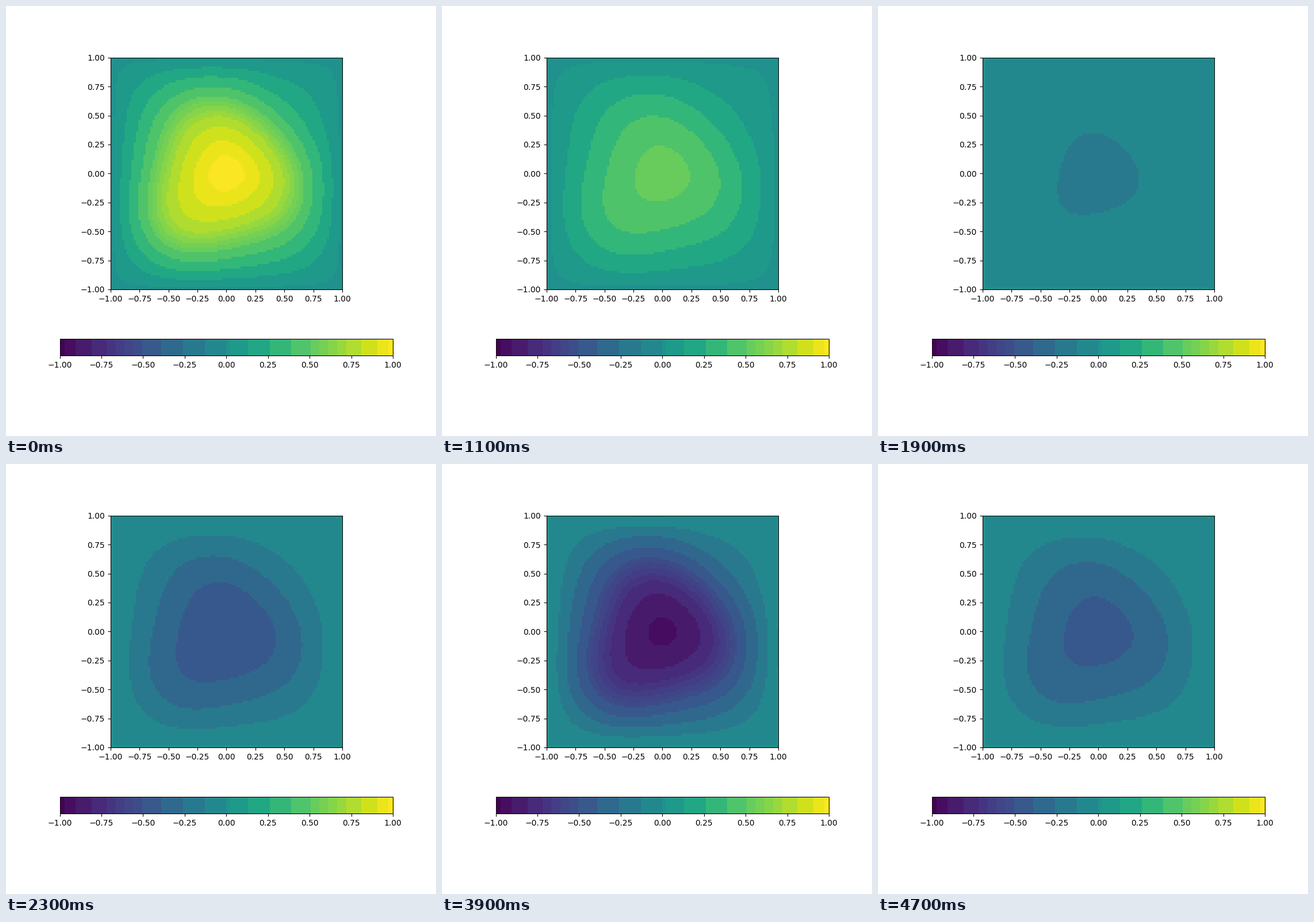
Recreate the animation shown at these times as a matplotlib script. Size 748 px wide and 748 px high, loop 4.9 s.

```python
import numpy as np
import matplotlib.pyplot as plt
from matplotlib.animation import FuncAnimation
from matplotlib.colors import ListedColormap

SIZE, INCHES = 748, 7.5
FRAMES, INTERVAL = 49, 100
CELLS = 100
OMEGA = np.pi / np.sqrt(2)


def band_edges():
    """Colour steps: wide near zero, narrow past one half, mirrored in sign."""
    half = np.r_[0.13:0.39:3j, 0.505:0.72:5j, 0.81, 0.905, 0.97]
    return np.r_[-1, -half[::-1], 0, 0.02, half, 1]


def banded_viridis(edges, n=2000):
    """Viridis reduced to one flat colour per band."""
    mids = (edges[:-1] + edges[1:]) / 2
    values = -1 + 2 * (np.arange(n) + 0.5) / n
    band = np.searchsorted(edges, values) - 1
    return ListedColormap(plt.get_cmap("viridis")((mids[band] + 1) / 2))


def membrane():
    """First mode of a square membrane with a three-sided skew."""
    axis = np.linspace(-1, 1, CELLS) * np.pi / 2
    x, y = np.meshgrid(axis, axis)
    sx, sy = np.sin(x), np.sin(y)
    skew = sx * sy * (sx + sy) / 2
    return np.cos(x) * np.cos(y) * (1 - 0.37 * np.sin(2.4 * skew))


shape = membrane()
fig, ax = plt.subplots(figsize=(INCHES, INCHES), dpi=SIZE / INCHES)
image = ax.imshow(shape, cmap=banded_viridis(band_edges()), vmin=-1, vmax=1,
                  origin="lower", extent=(-1, 1, -1, 1),
                  interpolation="nearest")
ticks = np.linspace(-1, 1, 9)
ax.set(xticks=ticks, yticks=ticks)
fig.colorbar(image, ax=ax, orientation="horizontal", ticks=ticks)


def update(i):
    t = 2 * i / FRAMES
    image.set_data(shape * np.cos(OMEGA * t))
    return (image,)


anim = FuncAnimation(fig, update, frames=FRAMES, interval=INTERVAL,
                     repeat=True, repeat_delay=0)
plt.show()
```
